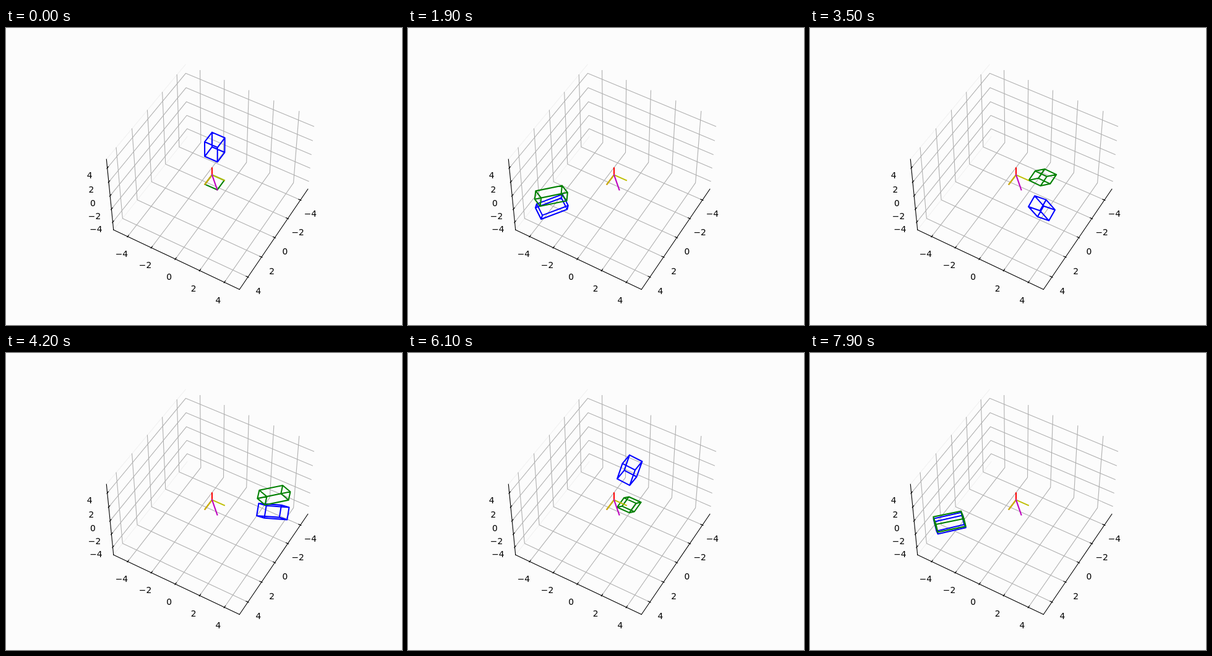
An HTML page for the animation above (8 s loop, 640 px wide and 480 px high).

```html
<!DOCTYPE html>
<html lang="en">
<head>
<meta charset="utf-8">
<title>Rotating box and its shadow</title>
<style>
  html, body { margin: 0; width: 100%; height: 100%; overflow: hidden; background: #fcfcfc; }
  svg { display: block; width: 640px; height: 480px; }
  path { fill: none; stroke-width: 1.11; stroke-linecap: square; stroke-linejoin: round; }
  text { font: 13.89px "DejaVu Sans", sans-serif; text-anchor: middle; fill: #000; }
  .pane { stroke: #f1f1f1; }
  .grid { stroke: #b0b0b0; }
  .axis { stroke: #000; }
  .thick { stroke-width: 2.08; }
  .box { stroke-linecap: round; }
</style>
</head>
<body>
<svg id="stage" viewBox="0 0 640 480" xmlns="http://www.w3.org/2000/svg"></svg>
<script>
const stage = document.getElementById('stage');
const SPAN = 10 * 25 / 48;   // half the extent of the walls
const LABEL_GAP = 0.864;
const FRAME_MS = 100, FRAMES = 80, STEP = 0.1;

const rad = Math.PI / 180;
const ce = Math.cos(50 * rad), se = Math.sin(50 * rad);
const ca = Math.cos(30 * rad), sa = Math.sin(30 * rad);

// Perspective camera: elevation 50°, azimuth 30°, distance 10
function project([x, y, z]) {
  x *= 0.8 / 7; y *= 0.8 / 7; z *= 0.6 / 7;
  const ground = x * ca + y * sa;
  const k = 1997.8 / (10 - ce * ground - se * z);
  return [333 + k * (y * ca - x * sa), 237.4 - k * (ce * z - se * ground)];
}

const line = (...pts) =>
  'M' + pts.map(p => project(p).map(v => v.toFixed(2)).join(' ')).join('L');

function add(tag, attrs, content = '') {
  const el = document.createElementNS(stage.namespaceURI, tag);
  for (const name in attrs) el.setAttribute(name, attrs[name]);
  el.textContent = content;
  stage.append(el);
  return el;
}
const path = (cls, d, stroke) =>
  add('path', stroke ? { class: cls, d, stroke } : { class: cls, d });

const S = SPAN, L = SPAN + LABEL_GAP;
const TIN = SPAN - 1 / 6, TOUT = SPAN + 1 / 12;

for (const z of [S, -S]) path('pane', line([-S, -S, z], [S, -S, z]));

const axes = [
  {
    edge: [[-S, S, -S], [S, S, -S]],
    grid: v => [[v, S, -S], [v, -S, -S], [v, -S, S]],
    tick: v => [[v, TIN, -S], [v, TOUT, -S]],
    label: v => [v, L, -L]
  },
  {
    edge: [[S, -S, -S], [S, S, -S]],
    grid: v => [[S, v, -S], [-S, v, -S], [-S, v, S]],
    tick: v => [[TIN, v, -S], [TOUT, v, -S]],
    label: v => [L, v, -L]
  },
  {
    edge: [[S, -S, -S], [S, -S, S]],
    grid: v => [[S, -S, v], [-S, -S, v], [-S, S, v]],
    tick: v => [[TIN, -S, v], [TOUT, -S, v]],
    label: v => [L, -L, v]
  }
];
const ticks = [-4, -2, 0, 2, 4];

for (const a of axes) for (const v of ticks) path('grid', line(...a.grid(v)));
for (const a of axes) {
  path('axis', line(...a.edge));
  for (const v of ticks) {
    path('axis', line(...a.tick(v))).style.strokeLinecap = 'butt';
    const [x, y] = project(a.label(v));
    add('text', { x, y: y + 10.8 }, String(v).replace('-', '\u2212'));
  }
}

const box = path('thick box', '', '#0000ff');
const shadow = path('thick box', '', '#008000');

const O = [0, 0, 0], X = [1, 0, 0], Y = [0, 1, 0], Z = [0, 0, 1];
path('thick', line(X, O, Z), '#ff0000');
path('thick', line(X, O, Y), '#bfbf00');
path('thick', line(O, [1, 1, 0]), '#bf00bf');

// Turn a point about the diagonal (1, 1, 0)
function turn([x, y, z], angle) {
  const c = Math.cos(angle), s = Math.sin(angle);
  const along = (x + y) / 2, across = (x - y) / Math.SQRT2;
  const side = (across * c + z * s) / Math.SQRT2;
  return [along + side, along - side, z * c - across * s];
}

const square = [[0, 0], [1, 0], [1, 1], [0, 1]];
const faces = [4, 6].map(z => square.map(([x, y]) => [x, y, z]));

function wire([low, high]) {
  return line(...low) + 'Z' + line(...high) + 'Z' +
    low.map((p, i) => line(p, high[i])).join('');
}

let shown = -1;
function draw(now) {
  const frame = Math.floor(now / FRAME_MS) % FRAMES;
  if (frame !== shown) {
    shown = frame;
    const turned = faces.map(f => f.map(p => turn(p, frame * STEP)));
    box.setAttribute('d', wire(turned));
    shadow.setAttribute('d', wire(turned.map(f => f.map(([x, y]) => [x, y, 0]))));
  }
  requestAnimationFrame(draw);
}
draw(0);
</script>
</body>
</html>
```
